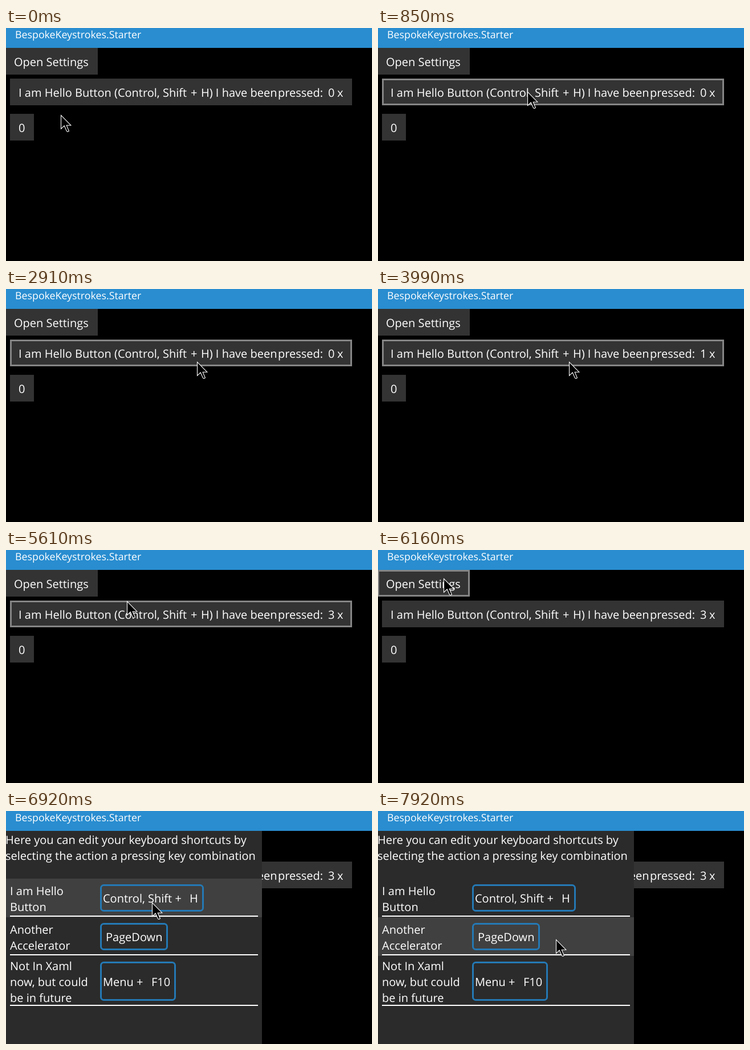
An HTML page that plays this animation: 642 px wide and 410 px high, repeating every 8 s.

```html
<!DOCTYPE html>
<html lang="en">
<head>
<meta charset="utf-8">
<title>Keyboard shortcuts</title>
<style>
  html, body { margin: 0; width: 100%; height: 100%; overflow: hidden; background: #000; }
  svg { display: block; width: 642px; height: 410px; }
  text {
    font: 20px "Open Sans", "Noto Sans", sans-serif;
    fill: #fff;
    text-rendering: geometricPrecision;
    white-space: pre;
  }
  .small { font-size: 17.8px; }
  .keys text { font-size: 40px; text-anchor: middle; }
  .button { fill: #333; }
  .edge { fill: none; stroke: #858585; stroke-width: 3; }
  .row { fill: #404040; }
  .rule { fill: #fff; }
  .box { fill: none; stroke: #2479b5; stroke-width: 3; }

  /* 1% = 80 ms */
  .cursor, .pane, .edge, .digit, .tip, .keys, .row { animation: 8s step-end infinite; }
  .cursor { animation-name: cursor; }
  .pane { animation-name: pane; }
  .hello { animation-name: hello; }
  .open { animation-name: open; }
  .tip { animation-name: tip; filter: drop-shadow(0 3px 6px rgba(0, 0, 0, .4)); }
  .keys { animation-name: keys; }
  .d0 { animation-name: d0; }
  .d1 { animation-name: d1; }
  .d2 { animation-name: d2; }
  .d3 { animation-name: d3; }
  .row1 { animation-name: row1; }
  .row2 { animation-name: row2; }

  @keyframes cursor {
    0% { transform: translate(96px, 153px); }
    0.875% { transform: translate(96px, 153px); animation-timing-function: steps(5, start); }
    5.75% { transform: translate(168px, 85px); animation-timing-function: steps(6, start); }
    11.6% { transform: translate(262px, 112px); }
    12.875% { transform: translate(262px, 112px); animation-timing-function: steps(4, start); }
    16.875% { transform: translate(312px, 136px); animation-timing-function: steps(3, start); }
    19.875% { transform: translate(335px, 132px); }
    21.625% { transform: translate(335px, 128px); }
    70.125% { transform: translate(212px, 90px); }
    71.25% { transform: translate(212px, 90px); animation-timing-function: steps(4, start); }
    75.125% { transform: translate(140px, 33px); animation-timing-function: steps(2, start); }
    77.06% { transform: translate(115px, 50px); }
    80.75% { transform: translate(115px, 50px); animation-timing-function: steps(7, start); }
    87.46% { transform: translate(256px, 161px); }
    92.375% { transform: translate(256px, 161px); animation-timing-function: steps(8, start); }
    99.95%, 100% { transform: translate(312px, 226px); }
  }
  @keyframes pane {
    0% { transform: translateX(-460px); }
    77.75% { transform: translateX(-187px); }
    78.75% { transform: translateX(-40px); }
    79.75% { transform: translateX(-11px); }
    80.75%, 100% { transform: none; }
  }
  @keyframes hello {
    0%, 4.775%, 15.875%, 71.25%, 100% { opacity: 0; }
    1.85%, 5.75%, 16.875% { opacity: 1; }
  }
  @keyframes open {
    0%, 74.16% { opacity: 0; }
    73.19%, 75.125%, 100% { opacity: 1; }
  }
  @keyframes tip {
    0% { opacity: 0; }
    21.625% { opacity: .2; }
    22.625% { opacity: .4; }
    23.625% { opacity: .6; }
    24.625% { opacity: .8; }
    25.625% { opacity: 1; }
    34.375% { opacity: .65; }
    35.375% { opacity: .3; }
    36.375%, 100% { opacity: 0; }
  }
  @keyframes keys {
    0%, 49.875%, 70.125%, 100% { opacity: 0; }
    39%, 54.5% { opacity: 1; }
  }
  @keyframes d0 { 0% { opacity: 1; } 39%, 100% { opacity: 0; } }
  @keyframes d1 { 0%, 54.5%, 100% { opacity: 0; } 39% { opacity: 1; } }
  @keyframes d2 { 0%, 59.5%, 100% { opacity: 0; } 54.5% { opacity: 1; } }
  @keyframes d3 { 0% { opacity: 0; } 59.5%, 100% { opacity: 1; } }
  @keyframes row1 { 0%, 95.21%, 100% { opacity: 0; } 84.58% { opacity: 1; } }
  @keyframes row2 { 0% { opacity: 0; } 95.21%, 100% { opacity: 1; } }
</style>
</head>
<body>
<svg viewBox="0 0 642 410">
  <rect width="642" height="410"/>

  <rect class="button" x="-1" y="35" width="162" height="47"/>
  <rect class="edge open" x=".5" y="36.5" width="159" height="44"/>
  <text x="14" y="67">Open Settings</text>

  <rect class="button" x="7" y="89" width="600" height="47"/>
  <rect class="edge hello" x="8.5" y="90.5" width="597" height="44"/>
  <text x="22" y="121">I am Hello Button (Control, Shift</text>
  <text x="324" y="121">+</text>
  <text x="342" y="121">H) I have been</text>
  <text x="477" y="121">pressed:</text>
  <text class="digit d0" x="565" y="121">0</text>
  <text class="digit d1" x="565" y="121">1</text>
  <text class="digit d2" x="565" y="121">2</text>
  <text class="digit d3" x="565" y="121">3</text>
  <text x="581" y="121">x</text>

  <rect class="button" x="7" y="151" width="42" height="47"/>
  <text x="22" y="183">0</text>

  <g class="tip">
    <rect x="267" y="53" width="128" height="44" fill="#2b2b2b" stroke="#1f1f1f" stroke-width="2"/>
    <text class="small" x="279.5" y="81">Ctrl+Shift+H</text>
  </g>

  <g class="keys">
    <rect x="154" y="339" width="335" height="63" fill="#333"/>
    <text x="321.5" y="385">Ctrl + Shift + H</text>
  </g>

  <g class="pane">
    <rect y="35" width="449" height="375" fill="#2b2b2b"/>
    <rect class="row row1" y="119" width="449" height="68"/>
    <rect class="row row2" y="187" width="449" height="68"/>
    <text x="-1" y="58">Here you can edit your keyboard shortcuts by</text>
    <text x="-1" y="86">selecting the action a pressing key combination</text>

    <text x="7" y="148">I am Hello</text>
    <text x="7" y="176">Button</text>
    <rect class="box" x="166.5" y="130.5" width="179" height="45" rx="5"/>
    <text x="170" y="161">Control, Shift +</text>
    <text x="322" y="161">H</text>
    <rect class="rule" x="7" y="184" width="435" height="2"/>

    <text x="7" y="216">Another</text>
    <text x="7" y="244">Accelerator</text>
    <rect class="box" x="166.5" y="198.5" width="116" height="45" rx="5"/>
    <text x="175" y="229">PageDown</text>
    <rect class="rule" x="7" y="252" width="435" height="2"/>

    <text x="7" y="280">Not In Xaml</text>
    <text x="7" y="308">now, but could</text>
    <text x="7" y="336">be in future</text>
    <rect class="box" x="166.5" y="266.5" width="130" height="66" rx="5"/>
    <text x="170" y="308">Menu +</text>
    <text x="255" y="308">F10</text>
    <rect class="rule" x="7" y="341" width="435" height="2"/>
  </g>

  <rect width="642" height="35" fill="#298dd0"/>
  <text class="small" x="16" y="18">BespokeKeystrokes.Starter</text>

  <path class="cursor" d="M.5 .5V24.5L6.2 19L10.5 28.7L12.3 29.6L14.4 28.3L10.2 18.2H17.8Z" fill="#000" stroke="#fff" stroke-width="1.1"/>
</svg>
</body>
</html>
```
